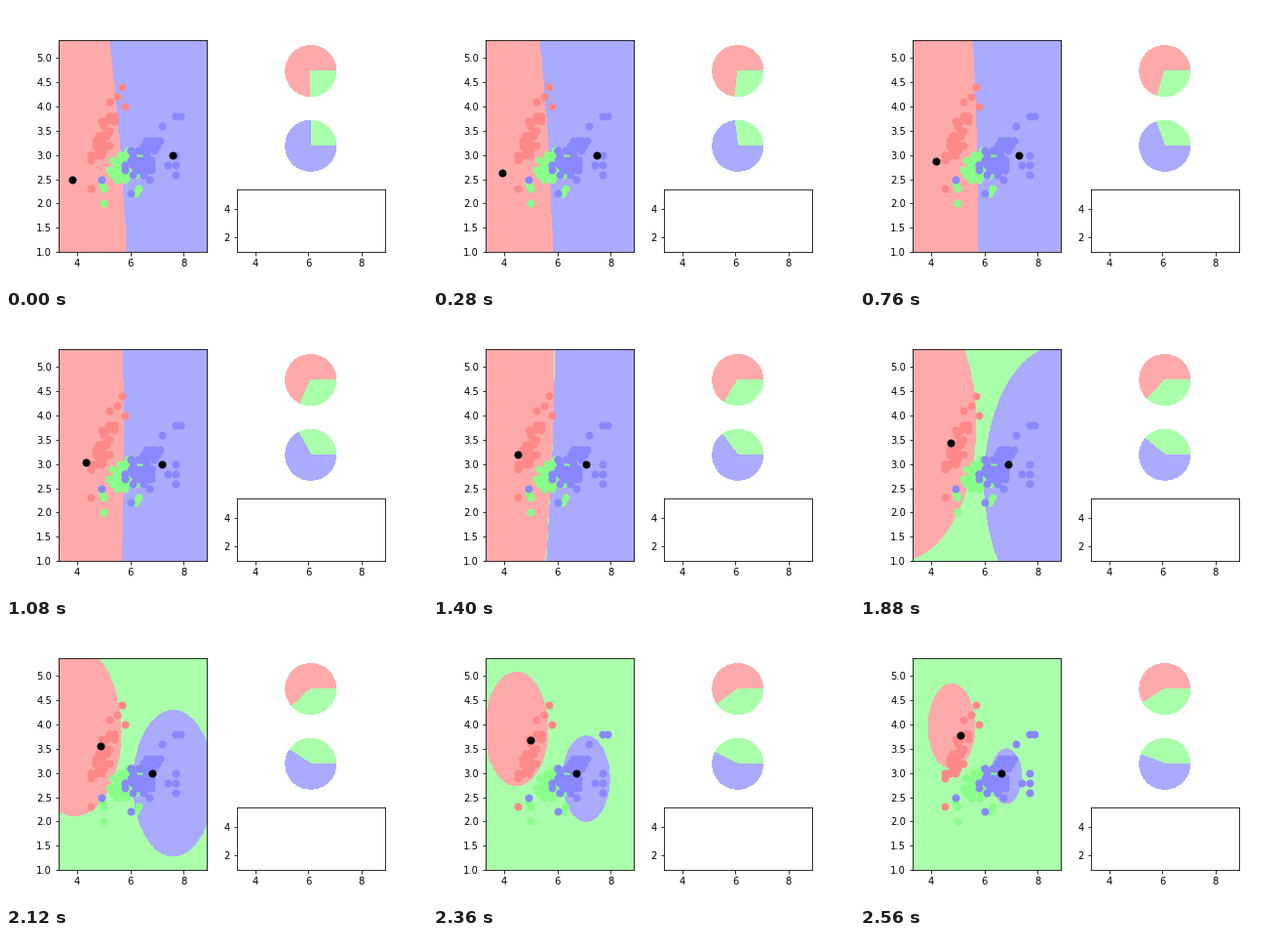
Animation of 432x288 px, one loop 2.6 s. Source, as a matplotlib script:

```python
import matplotlib.pyplot as plt
import numpy as np
from matplotlib.animation import FuncAnimation
from matplotlib.colors import to_rgb
from matplotlib.patches import Wedge

FRAMES, INTERVAL = 65, 40
REGION = ["#FFAAAA", "#AAFFAA", "#AAAAFF"]
DOTS = ["#FF8888", "#88FF88", "#8888FF"]
X0, X1, Y0, Y1, STEP = 3.3, 8.88, 1.0, 5.38, 0.02
DOT = dict(s=36, linewidths=2, antialiased=False)

rng = np.random.default_rng(4)


def cloud(mean, spread, corr, outliers, n=45):
    """Correlated cluster on a 0.1 lattice, plus its few outlying points."""
    u, v = rng.standard_normal((2, 4 * n))
    core = np.hypot(u, v) < 2
    u, v = u[core][:n], v[core][:n]
    x = mean[0] + spread[0] * u
    y = mean[1] + spread[1] * (corr * u + np.sqrt(1 - corr ** 2) * v)
    return np.vstack([np.column_stack([x, y]).round(1), outliers])


clouds = [
    cloud((4.95, 3.35), (0.28, 0.26), 0.65,
          [(4.5, 2.3), (5.2, 4.1), (5.5, 4.2), (5.7, 4.4), (5.8, 4.0)]),
    cloud((5.85, 2.8), (0.38, 0.21), 0.5,
          [(5.0, 2.0), (5.0, 2.3), (4.9, 2.4), (6.2, 2.2), (6.3, 2.3)]),
    cloud((6.45, 2.95), (0.38, 0.21), 0.45,
          [(4.9, 2.5), (6.0, 2.2), (6.7, 2.5), (7.2, 3.6), (7.7, 3.8),
           (7.9, 3.8), (7.7, 2.6), (7.7, 2.8), (7.7, 3.0), (7.4, 2.8)]),
]


def prototypes(i):
    """Positions and soft labels (red, green, blue) of both prototypes."""
    points = np.array([[3.8 + 0.02 * i, 2.5 + 0.02 * i],
                       [7.6 - 0.015 * i, 3.0]])
    labels = np.array([[0.945 - 0.0011 * i, 0.2735 + 0.0047 * i, 0],
                       [0, 0.212 + 0.0079 * i, 1 - 0.0017 * i]])
    return points, labels


def shares(i):
    """Share of the first wedge in each pie."""
    return 0.75 - 0.0025 * i, 0.25 + 0.003 * i


xs = X0 + STEP * np.arange(round((X1 - X0) / STEP))
ys = Y0 + STEP * np.arange(round((Y1 - Y0) / STEP))
grid_x, grid_y = np.meshgrid(xs, ys)
palette = np.array([to_rgb(c) for c in REGION])


def classify(points, labels):
    """Inverse-distance vote of the soft labels over the whole grid."""
    votes = 0
    for (px, py), label in zip(points, labels):
        dist = np.hypot(grid_x - px, grid_y - py) + 1e-9
        votes = votes + label / dist[..., None]
    return palette[votes.argmax(axis=2)]


fig = plt.figure(figsize=(6, 4), dpi=72)
fig.subplots_adjust(left=0.125, right=0.9, bottom=0.125, top=0.88,
                    wspace=0.2, hspace=0.2)

plane = fig.add_subplot(1, 2, 1)
image = plane.imshow(classify(*prototypes(0)), extent=(X0, X1, Y0, Y1),
                     origin="lower", aspect="auto", interpolation="nearest")
for dots, color in zip(clouds, DOTS):
    plane.scatter(*dots.T, color=color, **DOT)
markers = plane.scatter([0, 0], [0, 0], color="black", zorder=3, **DOT)
plane.set_yticks(np.arange(1, 5.1, 0.5))

empty = fig.add_subplot(3, 2, 6)
empty.set_yticks([2, 4])
for ax in (plane, empty):
    ax.set_xticks([4, 6, 8])
    ax.set_xlim(X0, X1)
    ax.set_ylim(Y0, Y1)


def make_pie(slot, first, second):
    ax = fig.add_subplot(3, 2, slot)
    ax.set(xlim=(-1.25, 1.25), ylim=(-1.25, 1.25), aspect="equal")
    ax.axis("off")
    return [ax.add_patch(Wedge((0, 0), 1.015, 0, 360, facecolor=REGION[k],
                               lw=0, antialiased=False))
            for k in (first, second)]


pies = [make_pie(2, 0, 1), make_pie(4, 1, 2)]


def update(i):
    points, labels = prototypes(i)
    image.set_data(classify(points, labels))
    markers.set_offsets(points)
    for (first, second), share in zip(pies, shares(i)):
        first.set_theta2(360 * share)
        second.set_theta1(360 * share)
    return [image, markers, *pies[0], *pies[1]]


anim = FuncAnimation(fig, update, frames=FRAMES, interval=INTERVAL,
                     repeat=True, blit=False)
plt.show()
```
